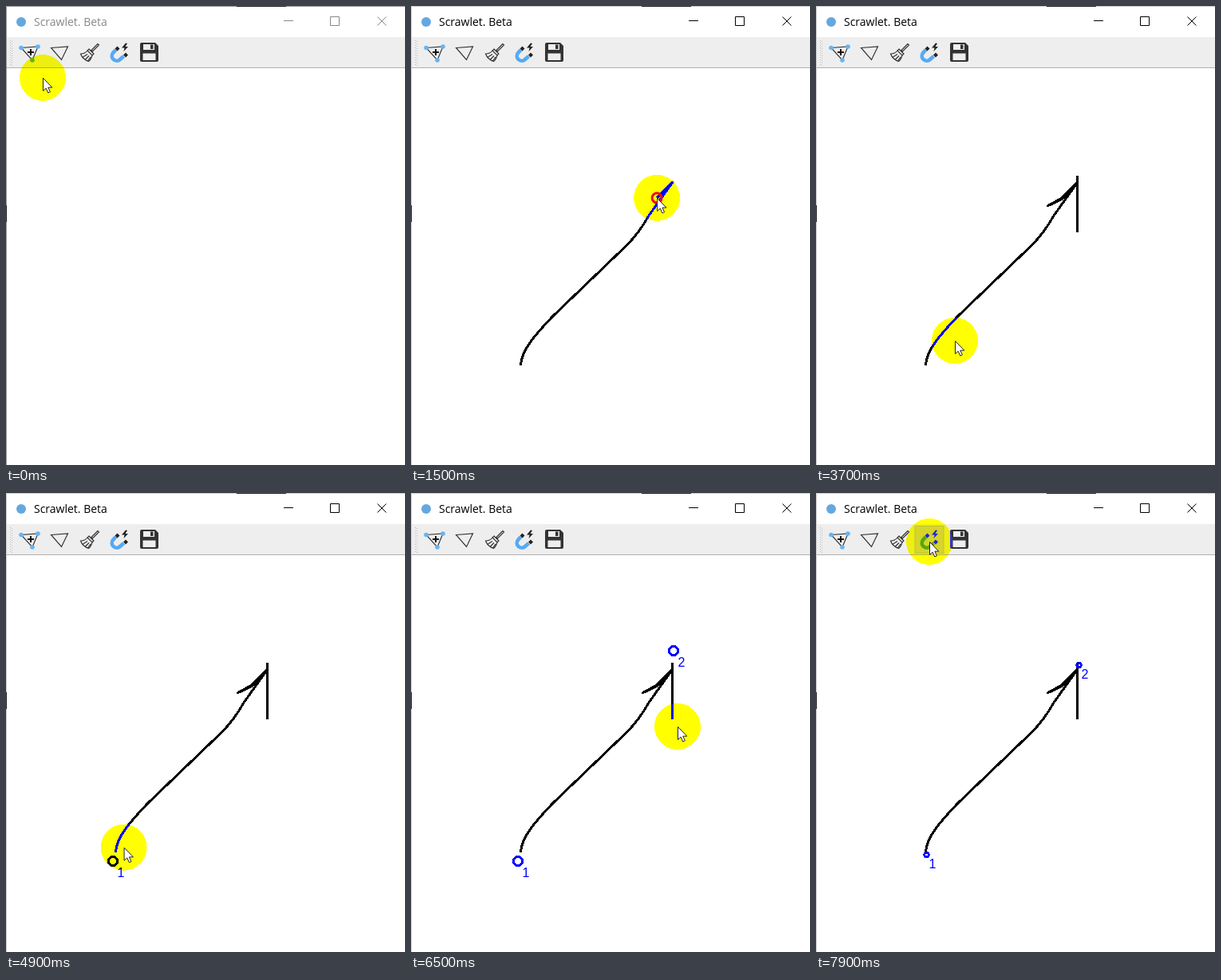
An HTML page for the animation above (8000 ms loop, 500 by 576 pixels).

```html
<!DOCTYPE html>
<html lang="en">
<head>
<meta charset="utf-8">
<style>
  html, body { margin: 0; width: 100%; height: 100%; overflow: hidden; background: #fff; }
  svg { display: block; width: 500px; height: 576px; isolation: isolate; }
  .title { font: 14px "Open Sans", sans-serif; }
  .label { font: 16px "Liberation Sans", Arial, sans-serif; fill: #00f; }
  .icon { fill: none; stroke: #333; stroke-width: 1.2; }
  .crisp { shape-rendering: crispEdges; }
  #spot { fill: #00f; mix-blend-mode: difference; }
</style>
</head>
<body>
<svg viewBox="0 0 500 576">
  <rect width="500" height="576" fill="#fff"/>
  <rect y="39" width="500" height="38" fill="#eee"/>
  <path d="M0 77.5H500" stroke="#b0b0b0"/>
  <path id="border" d="M.5 576V.5H500" fill="none"/>
  <path d="M289 .5H351M.5 250V271" stroke="#222"/>
  <path d="M5.5 43V75M7.5 44V75" stroke="#bbb" stroke-dasharray="1 2"/>

  <circle cx="19" cy="20" r="6" fill="#64a8e0"/>
  <text id="title" class="title" x="35" y="25">Scrawlet. Beta</text>
  <path id="controls" d="M348 18.5H360M406.5 13.5h11v11h-11ZM465.5 13.5l11 11m0-11l-11 11" fill="none"/>

  <rect id="hover" y="41.5" width="36" height="34" fill="#d5d5d5" stroke="#c2c2c2"/>
  <g id="tools">
    <path class="icon" d="M19 52.5L40 51L33 68Z"/>
    <path d="M31 54V62M27 58H35" stroke="#111" stroke-width="2"/>
    <g fill="#64b5f6">
      <circle cx="19" cy="52.5" r="2.8"/><circle cx="40" cy="51" r="2.8"/><circle cx="33" cy="68" r="2.8"/>
    </g>
    <path class="icon" d="M56.5 52.5L77.5 51L69.5 67.5Z"/>
    <path class="icon" d="M115 47.5l-8 8l1.5 1.5l8-8ZM104 54l6 6l-2 2l-6-6ZM102 56Q99 60 93.5 60Q96 67 103.5 69.5Q106 68 108 62M96.5 64l5.5-3.5M99.5 67l4.5-4.5M102.5 69l3.5-5"/>
    <path d="M137.5 55L134.5 58.5A5.8 5.8 0 0 0 143 67L147.5 63" fill="none" stroke="#55a9f5" stroke-width="4.6"/>
    <path d="M136.5 53.5l3-3l3 3l-3 3ZM147 61.5l3-3l3 3l-3 3ZM150 46.5l-5 6h3.5l-1 4.5l5.5-6h-3.5l2.5-4Z" fill="#222"/>
    <path d="M170 46H187L191 50V68Q191 70 189 70H170Q168 70 168 68V48Q168 46 170 46Z" fill="#333"/>
    <path d="M172 48h14v7h-14ZM171.5 59.5h16v8.5h-16Z" fill="#eee"/>
    <path d="M181 48.5h3.5v5.5h-3.5Z" fill="#333"/>
  </g>

  <path id="ink" class="crisp" fill="none" stroke="#000" stroke-width="3" stroke-linejoin="round"
    d="M137.5 451C138 431 160 408 177 390L268.5 302Q286 285 298 263L328 221L308 241L290 251L307 243L327.5 223V214V284"/>
  <g id="points"></g>
  <circle id="spot" class="crisp" r="29"/>
  <g id="cursor">
    <circle id="press" r="6" fill="none" stroke="#e8101c" stroke-width="3"/>
    <path d="M.5 .5V16.5L4.2 13.2L6.8 19L9.4 17.8L6.8 12.2H11.8Z" fill="#fff" stroke="#222"/>
  </g>
</svg>
<script>
const LOOP = 8000, STEP = 100;
const DRAW_START = 1000, DRAW_TIME = 1125, SNAP = 7800;
const CLICKS = [3200, 4200, 5700, 7700], CLICK_TIME = 200;
const $ = id => document.getElementById(id);
const ink = $('ink'), inkLength = ink.getTotalLength();

// Pointer trips; bend is the sideways pull of the arc relative to its length.
const HOME = { x: 46, y: 90 };
const trips = [
  { from: 0, to: 1000, x: 137, y: 451, bend: -.45 },
  { from: 1000, to: 2125, x: 327, y: 284, bend: 0 },
  { from: 2300, to: 2600, x: 81, y: 246, bend: -.1 },
  { from: 2900, to: 3200, x: 29, y: 46, bend: -.1 },
  { from: 3400, to: 3700, x: 174, y: 420, bend: .1 },
  { from: 3800, to: 4100, x: 134, y: 462, bend: -.1 },
  { from: 4740, to: 5500, x: 339, y: 201, bend: 0 },
  { from: 5500, to: 5700, x: 329, y: 198, bend: 0 },
  { from: 6000, to: 6500, x: 334, y: 293, bend: -.36 },
  { from: 6500, to: 7100, x: 61, y: 63, bend: .15 },
  { from: 7100, to: 7500, x: 142, y: 61, bend: 0 }
];

const marks = [
  { at: 4300, free: [134, 462], snapped: [138.5, 454] },
  { at: 5800, free: [329, 198], snapped: [329.5, 216] }
];

const progress = (t, from, to) => Math.min(1, Math.max(0, (t - from) / (to - from)));
const easeInOut = k => k * k * k * (k * (6 * k - 15) + 10);
const easeOut = k => 1 - (1 - k) ** 2;
const drawn = t => inkLength * easeOut(progress(t, DRAW_START, DRAW_START + DRAW_TIME));
const drawing = t => t >= DRAW_START && t < DRAW_START + DRAW_TIME;

function pointer(t) {
  if (drawing(t)) return ink.getPointAtLength(drawn(t));
  let { x, y } = HOME;
  for (const trip of trips) {
    if (t < trip.from) break;
    const k = easeInOut(progress(t, trip.from, trip.to));
    const dx = trip.x - x, dy = trip.y - y, side = 2 * k * (1 - k) * trip.bend;
    x += dx * k - dy * side;
    y += dy * k + dx * side;
  }
  return { x, y };
}

function markSvg({ at, free, snapped }, i, t) {
  if (t < at) return '';
  const snap = t >= SNAP;
  const [x, y] = snap ? snapped : free;
  return `<circle class="crisp" cx="${x}" cy="${y}" r="${snap ? 2.7 : 5.5}" fill="none" stroke="#00f" stroke-width="3"/>
    <text class="label" x="${x + (snap ? 3 : 5.5)}" y="${y + (snap ? 17 : 20)}">${i + 1}</text>`;
}

function render(t) {
  const active = t >= DRAW_START;
  $('title').setAttribute('fill', active ? '#000' : '#888');
  $('controls').setAttribute('stroke', active ? '#000' : '#888');
  $('border').setAttribute('stroke', active ? '#ccc' : '#999');

  ink.setAttribute('stroke-dasharray', `${drawn(t)} ${inkLength + 1}`);
  $('points').innerHTML = marks.map((mark, i) => markSvg(mark, i, t)).join('');

  const { x, y } = pointer(t);
  const button = Math.floor((x - 11) / 37.5);
  const over = y > 41 && y < 76 && button >= 0 && button < 5;
  $('hover').setAttribute('x', 11.5 + 37.5 * button);
  $('hover').style.display = over ? '' : 'none';

  const move = `translate(${x} ${y})`;
  $('spot').setAttribute('transform', move);
  $('cursor').setAttribute('transform', move);
  const pressed = drawing(t) || CLICKS.some(click => t >= click && t < click + CLICK_TIME);
  $('press').style.display = pressed ? '' : 'none';
}

const start = performance.now();
function tick() {
  const t = (performance.now() - start) % LOOP;
  render(Math.floor(t / STEP) * STEP);
  requestAnimationFrame(tick);
}
tick();
</script>
</body>
</html>
```
